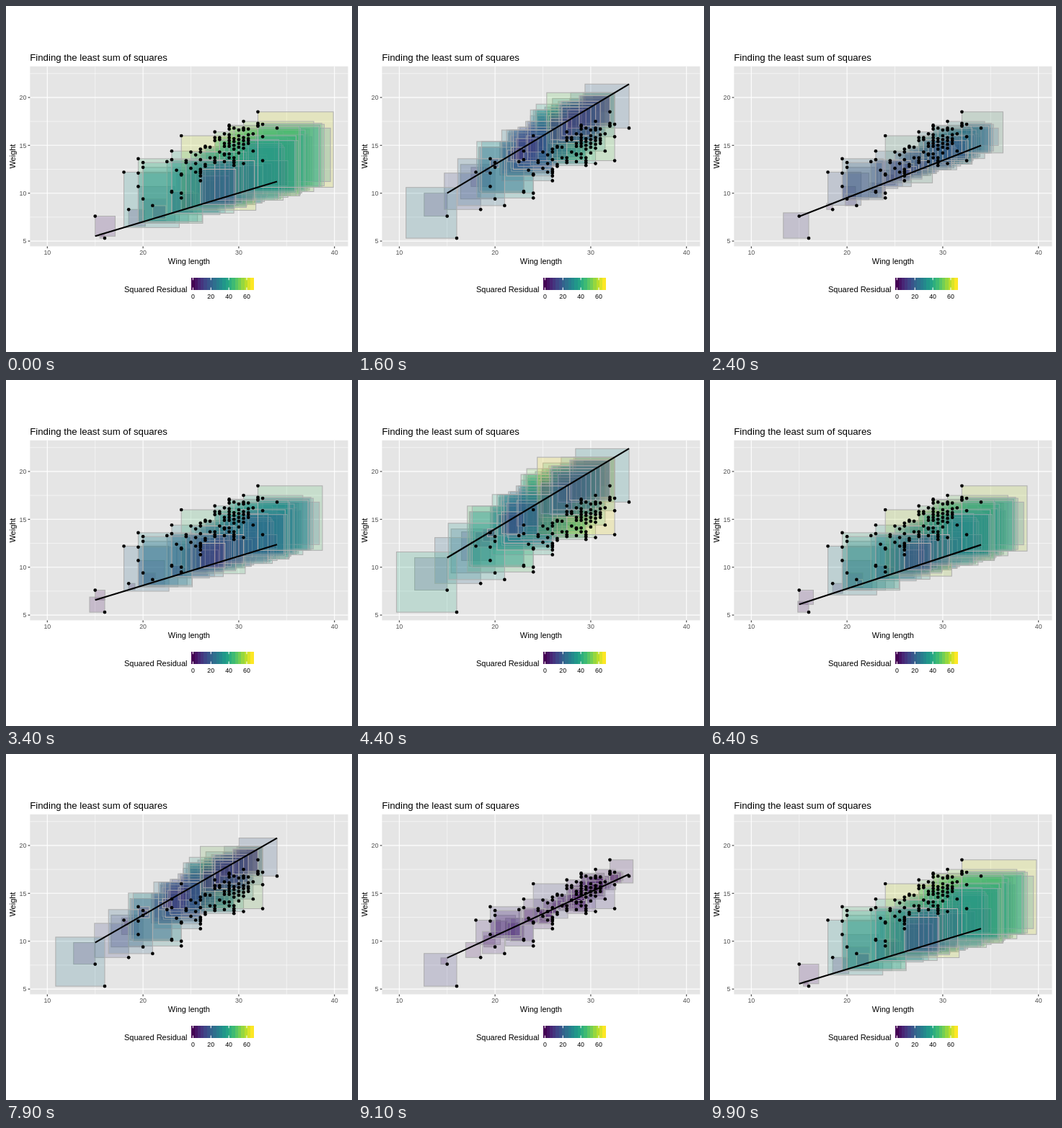
An HTML page for the animation above (10000 ms loop, 480 px wide and 480 px high).

```html
<!DOCTYPE html>
<html lang="en">
<head>
<meta charset="utf-8">
<title>Finding the least sum of squares</title>
<style>
  html, body { margin: 0; width: 100%; height: 100%; overflow: hidden; background: #fff; }
  svg { display: block; width: 480px; height: 480px; }
  text { font-family: "Liberation Sans", Arial, sans-serif; font-size: 11px; fill: #000; }
  .title { font-size: 13.2px; }
  .tick { font-size: 8.8px; fill: #4d4d4d; }
  .key { font-size: 8.8px; }
  .mid { text-anchor: middle; }
  .end { text-anchor: end; }
  .axis { stroke: #333; stroke-width: 1.07; }
  .major { stroke: #fff; stroke-width: 1.07; }
  .minor { stroke: #fff; stroke-width: .53; }
  .square { fill-opacity: .2; stroke: #b0b0b0; stroke-width: 1.07; }
  .fit { stroke: #000; stroke-width: 2.13; }
</style>
</head>
<body>
<svg viewBox="0 0 480 480"></svg>
<script>
const svg = document.querySelector('svg');
const UNIT = 13.28;
const px = x => 190.1 + (x - 20) * UNIT;
const py = y => 193.3 - (y - 15) * UNIT;
const panel = { l: 33.3, t: 83.7, r: 474.5, b: 333.4 };

function set(el, attrs) {
  for (const key in attrs) el.setAttribute(key, attrs[key]);
  return el;
}
function add(tag, attrs, text) {
  const el = set(document.createElementNS('http://www.w3.org/2000/svg', tag), attrs);
  if (text !== undefined) el.textContent = text;
  return svg.appendChild(el);
}
const line = (x1, y1, x2, y2, cls) => add('line', { x1, y1, x2, y2, class: cls });
const label = (x, y, text, cls) => add('text', { x, y, class: cls }, text);
const mix = (a, b, f) => a + (b - a) * f;
const mixAll = (a, b, f) => a.map((v, i) => mix(v, b[i], f));
const rgb = c => `rgb(${c.map(Math.round)})`;

const viridis = ['440154', '482878', '3e4989', '31688e', '26828e',
                 '1f9e89', '35b779', '6dcd59', 'b4de2c', 'fde725']
  .map(hex => [0, 2, 4].map(i => parseInt(hex.substr(i, 2), 16)));
function shade(t) {
  const p = Math.min(1, Math.max(0, t)) * 9;
  const i = Math.min(8, Math.floor(p));
  return mixAll(viridis[i], viridis[i + 1], p - i);
}

// Weights grouped by wing length
const weights = {
  15: [7.6], 16: [5.3], 18: [12.2], 18.5: [8.3],
  19.5: [13.6, 12.1, 10.7], 20: [13.2, 12.7, 9.4], 21: [8.7],
  22.5: [13.3], 23: [14.4, 13.5, 10.2, 10.1], 23.5: [12.4],
  24: [16, 12, 11.9, 10, 9.5], 24.5: [13.4, 13.2], 25: [14.3, 12.6],
  25.5: [14, 13.1, 12.2], 26: [14.6, 14.3, 13.5, 12.5, 12.3, 12.1, 11.8, 11.3],
  26.5: [14.9, 14.8, 13, 12.8], 27: [14.8, 13.7],
  27.5: [16.4, 15.8, 15.5, 13.7, 13.4, 13.2], 28: [15.8, 15.6, 14.3],
  28.5: [16.2, 15.2, 14.9, 14.1, 14, 13.3],
  29: [17.1, 17, 16.7, 16.1, 15.8, 15.5, 15.2, 14.9, 14.1, 13.7],
  29.5: [16.8, 15.7, 15.4, 15, 14.6, 13.7, 13.4, 13.2, 12.9],
  30: [16.6, 16, 15.6, 15.2, 14.8, 14.2],
  30.5: [17.5, 16.8, 16.6, 15.8, 15.5, 15.1, 14.7, 13.1],
  31: [16.7, 16.1, 15.7, 15.5, 15.2], 31.5: [16.2, 14.4],
  32: [18.5, 17.3, 17.1, 17], 32.5: [17.2, 15.9, 13.4], 34: [16.8]
};
const birds = Object.keys(weights)
  .flatMap(x => weights[x].map(y => ({ x: +x, y })))
  .map((bird, i) => ({ ...bird, rank: i * 0.618 % 1 }))
  .sort((a, b) => a.rank - b.rank);

// Intercept and slope of each tried line; the seventh is the best fit
const fits = [[1, .3], [1, .6], [2, .3], [2, .6], [1.2, .3], [1.2, .6], [1.365, .467]];
const starts = [2.5, 16.5, 31.9, 46.8, 60.3, 74.3, 88.2];
const MOVE = 13, FRAMES = 100, MAX_SQUARE = 66;
const residual = (bird, [a, b]) => bird.y - a - b * bird.x;

// Panel, grid and axes
add('rect', { x: panel.l, y: panel.t, width: panel.r - panel.l, height: panel.b - panel.t, fill: '#e5e5e5' });
const column = (x, cls) => line(px(x), panel.t, px(x), panel.b, cls);
const row = (y, cls) => line(panel.l, py(y), panel.r, py(y), cls);
[15, 25, 35].forEach(x => column(x, 'minor'));
[7.5, 12.5, 17.5, 22.5].forEach(y => row(y, 'minor'));
[10, 20, 30, 40].forEach(x => {
  column(x, 'major');
  line(px(x), panel.b, px(x), panel.b + 2.75, 'axis');
  label(px(x), 345.3, x, 'tick mid');
});
[5, 10, 15, 20].forEach(y => {
  row(y, 'major');
  line(panel.l - 2.75, py(y), panel.l, py(y), 'axis');
  label(28.4, py(y) + 3.2, y, 'tick end');
});
label(33.3, 76, 'Finding the least sum of squares', 'title');
label(253.9, 358, 'Wing length', 'mid');
set(label(0, 0, 'Weight', 'mid'), { transform: 'translate(13.2 208.6) rotate(-90)' });

// Colour key
const key = { x: 257.2, y: 376.8, h: 17.28, bin: 4.32, bins: 20 };
label(164, 397, 'Squared Residual', '');
for (let i = 0; i < key.bins; i++) {
  add('rect', {
    x: key.x + i * key.bin, y: key.y, width: key.bin, height: key.h,
    fill: rgb(shade(i / (key.bins - 1))), 'shape-rendering': 'crispEdges'
  });
}
[0, 20, 40, 60].forEach(v => {
  const x = key.x + key.bin * (.5 + v / MAX_SQUARE * (key.bins - 1));
  line(x, key.y, x, key.y + key.h / 5, 'major');
  line(x, key.y + key.h * .8, x, key.y + key.h, 'major');
  label(x, 406, v, 'key mid');
});

// Squares, points and line
birds.forEach(bird => {
  bird.square = add('rect', { class: 'square' });
  bird.shades = fits.map(fit => shade(residual(bird, fit) ** 2 / MAX_SQUARE));
});
birds.forEach(bird => add('circle', { cx: px(bird.x), cy: py(bird.y), r: 2.35 }));
const fitLine = line(px(15), 0, px(34), 0, 'fit');

function ease(u) {
  return u < .5 ? 4 * u ** 3 : 1 - 4 * (1 - u) ** 3;
}

function draw(frame) {
  const time = frame < starts[0] ? frame + FRAMES : frame;
  const from = starts.filter(s => s <= time).length - 1;
  const to = (from + 1) % fits.length;
  const f = ease(Math.min(1, (time - starts[from]) / MOVE));
  const fit = mixAll(fits[from], fits[to], f);

  for (const bird of birds) {
    const r = residual(bird, fit);
    const side = Math.abs(r) * UNIT;
    set(bird.square, {
      x: px(Math.min(bird.x, bird.x + r)),
      y: py(Math.max(bird.y, bird.y - r)),
      width: side, height: side,
      fill: rgb(mixAll(bird.shades[from], bird.shades[to], f))
    });
  }
  set(fitLine, { y1: py(fit[0] + fit[1] * 15), y2: py(fit[0] + fit[1] * 34) });
}

let shown = -1;
const begin = performance.now();
function tick() {
  const frame = Math.floor(Math.max(0, performance.now() - begin) / 100) % FRAMES;
  if (frame !== shown) draw(shown = frame);
  requestAnimationFrame(tick);
}
tick();
</script>
</body>
</html>
```
